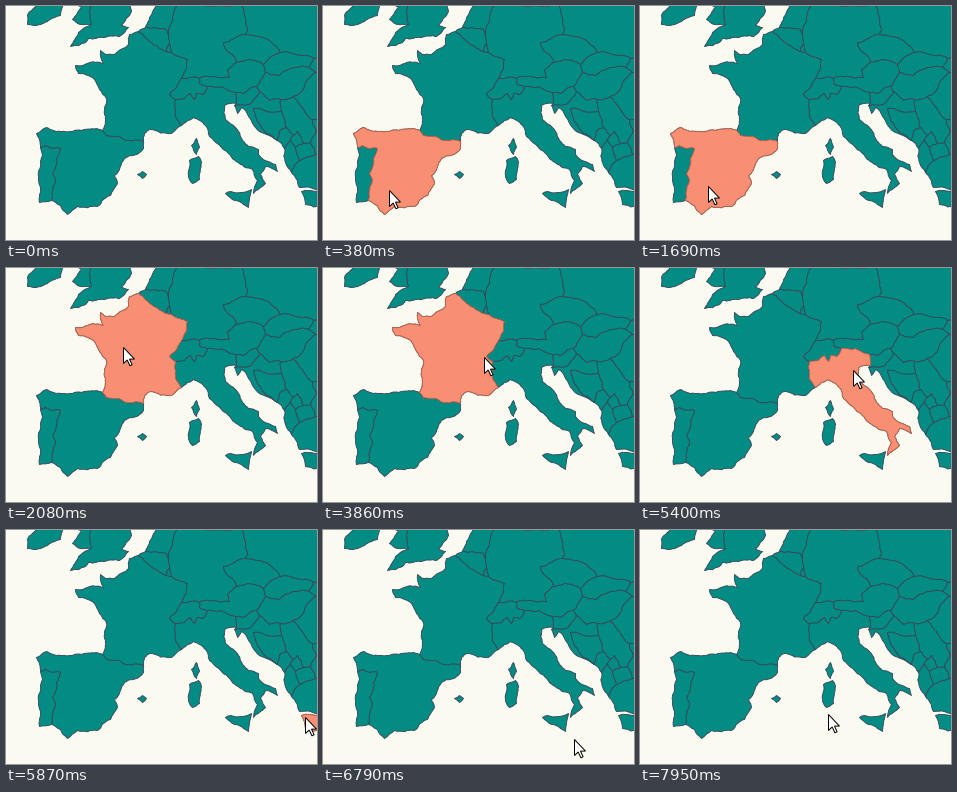
Recreate the animation shown at these times as a matplotlib script. Size 311 px wide and 234 px high, loop 8 s.

```python
import random

import matplotlib.pyplot as plt
import numpy as np
from matplotlib.animation import FuncAnimation
from matplotlib.collections import PolyCollection
from matplotlib.patches import Polygon
from matplotlib.path import Path

W, H, DPI = 311, 234, 100
SEA, LAND, HOVER = "#fafaf0", "#028c83", "#f98f72"
EDGE, HOVER_EDGE = "#34495e", "#b9634f"
LOOP, STEP, TICK = 8000, 20, 77.2  # ms

rng = random.Random(4)


def rough(p, q, amp=0.1, detail=3.5):
    """Split a segment into a slightly uneven line, without its first point."""
    (x0, y0), (x1, y1) = p, q
    if np.hypot(x1 - x0, y1 - y0) < detail:
        return [q]
    k = rng.uniform(-amp, amp)
    mid = ((x0 + x1) / 2 + k * (y1 - y0), (y0 + y1) / 2 - k * (x1 - x0))
    return rough(p, mid) + rough(mid, q)


def arc(*v):
    """Uneven line through x, y key points."""
    pts = list(zip(v[::2], v[1::2]))
    out = pts[:1]
    for p, q in zip(pts, pts[1:]):
        out += rough(p, q)
    return out


def ring(*arcs):
    """Join arcs end to end, turning each one to fit."""
    pts = list(arcs[0])
    if len(arcs) > 1 and pts[-1] not in (arcs[1][0], arcs[1][-1]):
        pts.reverse()
    for a in arcs[1:]:
        pts += a if a[0] == pts[-1] else a[::-1]
    return np.array(pts) + 0.5


def island(*v):
    return ring(arc(*v, *v[:2]))


# Coasts
spain_n = arc(96, 124, 68, 124, 40, 121, 30, 127, 34, 141)
portugal_w = arc(34, 141, 36, 149, 32, 174, 34, 181, 33, 196, 45, 194)
spain_s = arc(45, 194, 54, 199, 61, 208, 71, 200, 91, 200, 104, 189, 111, 177, 108, 169,
              118, 152, 137, 142, 137, 135)
france_w = arc(132, 25, 123, 28, 122, 38, 108, 48, 99, 48, 94, 44, 97, 57, 83, 56, 69, 59,
               72, 67, 88, 73, 93, 83, 100, 92, 99, 110, 96, 124)
france_s = arc(137, 135, 138, 127, 144, 123, 165, 127, 175, 119)
italy_coast = arc(175, 119, 187, 111, 199, 119, 203, 130, 222, 147, 246, 163, 251, 174,
                  247, 187, 259, 177, 254, 168, 259, 160, 271, 165, 269, 158, 252, 148, 252, 143,
                  242, 140, 236, 134, 229, 121, 219, 113, 218, 99, 230, 97)
belgium_n = arc(132, 25, 139, 21)
dutch_w = arc(139, 21, 152, -4)
slovenia_w = arc(230, 97, 228, 99)
croatia_w = arc(228, 99, 231, 107, 235, 101, 249, 121, 271, 134)
monte_w = arc(271, 134, 278, 142)
albania_w = arc(278, 142, 279, 156, 285, 166)
greece_w = arc(285, 166, 293, 181, 315, 184)

# Land borders
pt_es = arc(34, 141, 39, 139, 54, 142, 50, 152, 46, 167, 49, 173, 46, 190, 45, 194)
fr_es = arc(96, 124, 100, 129, 123, 134, 137, 135)
fr_it = arc(175, 119, 170, 112, 169, 102, 169, 93)
fr_ch = arc(169, 93, 163, 88, 175, 72)
fr_de = arc(175, 72, 181, 53, 165, 46)
fr_lu = arc(165, 46, 160, 45)
fr_be = arc(160, 45, 147, 38, 132, 25)
be_nl = arc(139, 21, 160, 23, 162, 29)
be_de = arc(162, 29, 163, 37)
be_lu = arc(163, 37, 160, 45)
lu_de = arc(163, 37, 165, 46)
nl_de = arc(162, 29, 163, 20, 172, -4)
de_pl = arc(234, -4, 241, 24, 239, 28)
de_cz = arc(239, 28, 217, 36, 219, 42, 230, 56)
de_at = arc(230, 56, 221, 64, 223, 71, 193, 72)
de_ch = arc(193, 72, 175, 72)
ch_at = arc(193, 72, 193, 77, 201, 80)
ch_it = arc(201, 80, 196, 88, 190, 87, 188, 93, 184, 87, 178, 92, 169, 93)
at_it = arc(201, 80, 215, 80, 229, 86)
at_si = arc(229, 86, 237, 87, 250, 80)
at_hu = arc(250, 80, 259, 66)
at_sk = arc(259, 66, 257, 58)
at_cz = arc(257, 58, 241, 53, 230, 56)
cz_sk = arc(257, 58, 274, 46)
cz_pl = arc(274, 46, 265, 36, 239, 28)
sk_pl = arc(274, 46, 289, 48, 307, 52)
sk_hu = arc(259, 66, 273, 69, 287, 61, 302, 61)
sk_ua = arc(302, 61, 307, 52)
hu_ua = arc(302, 61, 309, 66)
hu_ro = arc(309, 66, 294, 86, 287, 90)
hu_rs = arc(287, 90, 274, 93)
hu_hr = arc(274, 93, 263, 94, 253, 85)
hu_si = arc(253, 85, 250, 80)
it_si = arc(229, 86, 230, 97)
si_hr = arc(228, 99, 243, 98, 253, 85)
hr_ba = arc(271, 134, 251, 115, 247, 102, 275, 105)
hr_rs = arc(275, 105, 274, 93)
ba_rs = arc(275, 105, 280, 121)
ba_me = arc(280, 121, 273, 125, 271, 134)
me_rs = arc(280, 121, 287, 129)
me_xk = arc(287, 129, 284, 133)
me_al = arc(284, 133, 278, 142)
xk_rs = arc(287, 129, 291, 125, 297, 137)
xk_mk = arc(297, 137, 289, 141)
xk_al = arc(289, 141, 284, 133)
al_mk = arc(289, 141, 293, 154)
al_gr = arc(293, 154, 285, 166)
mk_gr = arc(293, 154, 309, 148)
mk_bg = arc(309, 148, 304, 136)
mk_rs = arc(304, 136, 297, 137)
rs_bg = arc(304, 136, 310, 125, 306, 113)
rs_ro = arc(306, 113, 296, 101, 287, 90)
wales_e = arc(85, 18, 83, 5, 84, -4)

countries = [
    # Ireland, Wales, England
    island(33, -4, 21, 9, 21, 18, 27, 19, 54, 9, 58, -4),
    ring(wales_e, arc(84, -4, 68, -4, 75, 1, 66, 13, 74, 18, 85, 18)),
    ring(wales_e, arc(85, 18, 72, 26, 64, 40, 79, 36, 82, 32, 113, 30, 122, 21, 115, 19,
                      125, 5, 124, -4, 84, -4)),
    # West
    ring(spain_n, pt_es, spain_s, fr_es),
    ring(portugal_w, pt_es),
    ring(france_w, fr_es, france_s, fr_it, fr_ch, fr_de, fr_lu, fr_be),
    ring(italy_coast, it_si, at_it, ch_it, fr_it),
    ring(belgium_n, be_nl, be_de, be_lu, fr_be),
    ring(fr_lu, be_lu, lu_de),
    ring(dutch_w, arc(152, -4, 172, -4), nl_de, be_nl),
    # Centre
    ring(de_pl, de_cz, de_at, de_ch, fr_de, lu_de, be_de, nl_de, arc(172, -4, 234, -4)),
    ring(fr_ch, de_ch, ch_at, ch_it),
    ring(de_at, at_cz, at_sk, at_hu, at_si, at_it, ch_at),
    ring(de_cz, at_cz, cz_sk, cz_pl),
    ring(de_pl, cz_pl, sk_pl, arc(307, 52, 320, 52, 320, -4, 234, -4)),
    ring(at_sk, cz_sk, sk_pl, sk_ua, sk_hu),
    ring(sk_ua, hu_ua, arc(309, 66, 320, 67, 320, 52, 307, 52)),
    ring(at_hu, sk_hu, hu_ua, hu_ro, hu_rs, hu_hr, hu_si),
    # South-east
    ring(it_si, at_si, hu_si, si_hr, slovenia_w),
    ring(croatia_w, hr_ba, hr_rs, hu_hr, si_hr),
    ring(hr_ba, ba_rs, ba_me),
    ring(hu_rs, hr_rs, ba_rs, me_rs, xk_rs, mk_rs, rs_bg, rs_ro),
    ring(monte_w, me_al, me_xk, me_rs, ba_me),
    ring(me_xk, xk_rs, xk_mk, xk_al),
    ring(albania_w, al_gr, al_mk, xk_al, me_al),
    ring(al_mk, xk_mk, mk_rs, mk_bg, mk_gr),
    ring(hu_ro, rs_ro, arc(306, 113, 320, 114, 320, 67, 309, 66)),
    ring(rs_bg, mk_bg, arc(309, 148, 320, 147, 320, 114, 306, 113)),
    ring(greece_w, arc(315, 184, 320, 147, 309, 148), mk_gr, al_gr),
    # Islands
    island(295, 185, 303, 184, 318, 187, 316, 200, 299, 198),
    island(219, 187, 224, 185, 235, 186, 245, 183, 242, 201, 228, 194),
    island(183, 154, 192, 150, 195, 156, 193, 173, 186, 177, 183, 173),
    island(190, 132, 193, 141, 190, 148, 185, 139),
    island(131, 168, 136, 165, 140, 168, 136, 172),
]
paths = [Path(c) for c in countries]


def ease_in(u):
    return u ** 1.85


def ease_out(u):
    return 1 - (1 - u) ** 1.45


def brake(u):
    return 1 - (1 - u) ** 3


def smooth(u):
    return u ** 3 * (10 - 15 * u + 6 * u * u)


# Pointer moves: first tick, last tick, easing, start, bend, end
moves = [
    (0, 5, brake, (58, 236), (62, 210), (66, 184)),
    (21, 27, smooth, (66, 184), (92, 131), (117, 79)),
    (44, 53, ease_in, (117, 79), (164, 90), (211, 101)),
    (69, 80, smooth, (211, 101), (345, 150), (277, 222)),
    (80, 81, smooth, (277, 222), (279, 230), (281, 238)),
    (82, 93, ease_out, (281, 238), (259, 217), (237, 195)),
    (97, 103, smooth, (237, 195), (215, 240), (188, 184)),
]
ARROW = np.array([(0, 0), (0, 16), (3.7, 12.5), (6.4, 18.3), (8.6, 17.3), (6, 11.6), (11, 11.6)])


def tip_at(tick):
    first, last, ease, *pts = [m for m in moves if m[0] <= tick][-1]
    a, b, c = np.array(pts, float)
    s = ease(min(1, (tick - first) / (last - first)))
    return ((1 - s) ** 2 * a + 2 * s * (1 - s) * b + s * s * c).round() + 0.5


fig = plt.figure(figsize=(W / DPI, H / DPI), dpi=DPI, facecolor=SEA)
ax = fig.add_axes([0, 0, 1, 1])
ax.set(xlim=(0, W), ylim=(H, 0))
ax.axis("off")

px = 72 / DPI
ax.add_collection(PolyCollection(countries, facecolor=LAND, edgecolor=EDGE, linewidth=0.9 * px),
                  autolim=False)
hover = Polygon(countries[0], facecolor=HOVER, edgecolor=HOVER_EDGE, linewidth=0.9 * px, zorder=3)
pointer = Polygon(ARROW, facecolor="white", edgecolor="black", linewidth=px,
                  joinstyle="miter", zorder=4)
ax.add_patch(hover)
ax.add_patch(pointer)


def update(i):
    tip = tip_at(int((i + 1) * STEP / TICK))
    pointer.set_xy(ARROW + tip)
    hit = next((c for c, p in zip(countries, paths) if p.contains_point(tip)), None)
    hover.set_visible(hit is not None)
    if hit is not None:
        hover.set_xy(hit)
    return hover, pointer


anim = FuncAnimation(fig, update, frames=LOOP // STEP, interval=STEP, repeat=True, repeat_delay=0)
plt.show()
```
